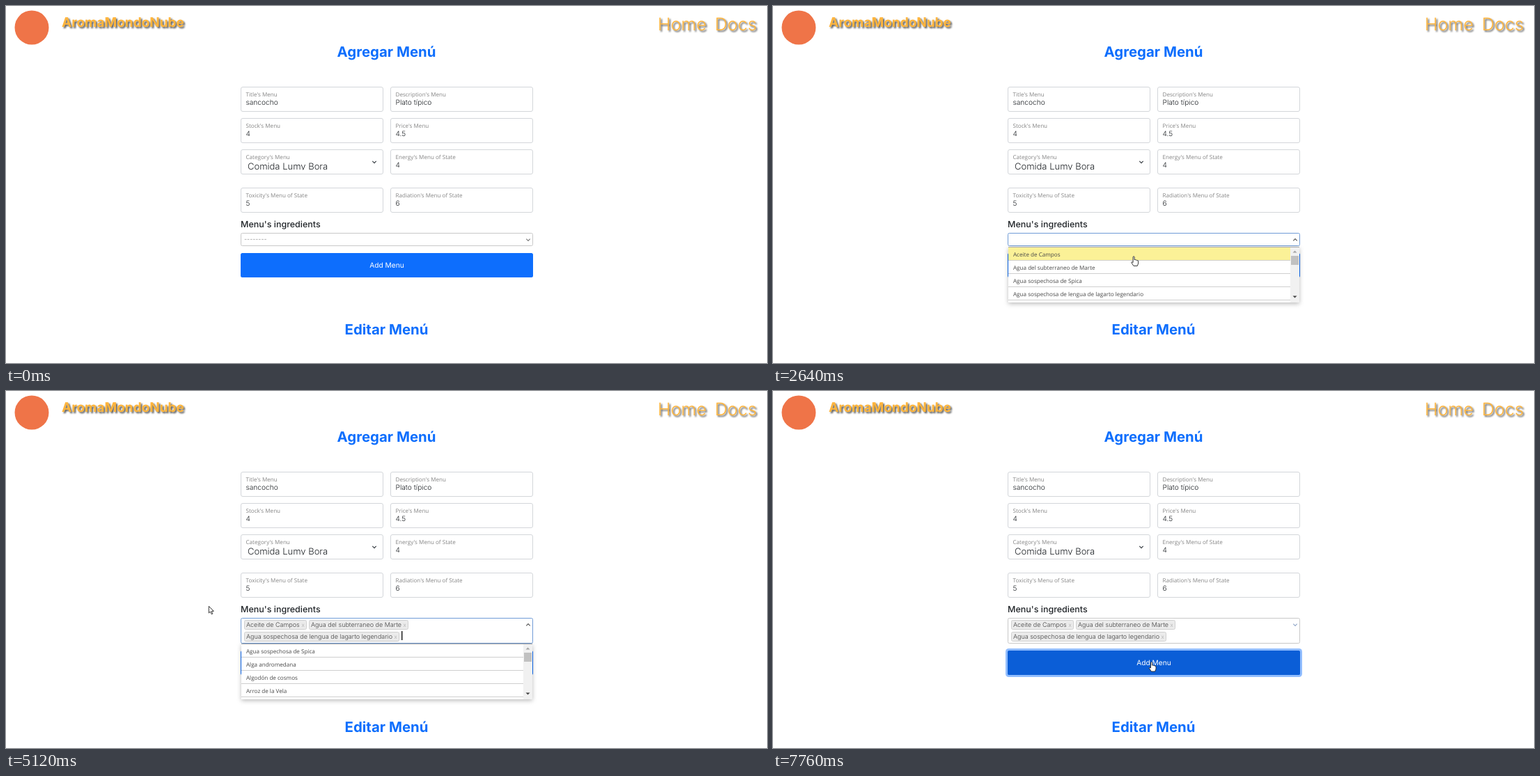
These frames come from a looping animation (1093 by 513 pixels, 8000 ms). An HTML page:

```html
<!DOCTYPE html>
<html lang="es">
<head>
<meta charset="utf-8">
<style>
html, body { margin: 0; width: 100%; height: 100%; overflow: hidden; background: #fff; }
svg { display: block; width: 1093px; height: 513px; }
text { font-family: Inter, sans-serif; font-weight: 300; white-space: pre; text-rendering: geometricPrecision; }
.brand { font-size: 19px; font-weight: 700; }
.nav { font-size: 25.2px; }
.brand, .nav { fill: #ffb53c; filter: drop-shadow(2px 2px 1px #555); }
.head { font-size: 20.4px; font-weight: 700; fill: #0d6efd; text-anchor: middle; }
.label, .item { font-family: "Open Sans", sans-serif; font-weight: 400; font-size: 8.1px; fill: #858585; }
.item { fill: #484848; }
.value { font-size: 10.2px; fill: #212529; }
.choice { font-size: 13px; fill: #212529; }
.title { font-size: 12.5px; font-weight: 500; fill: #212529; }
.add { font-size: 10.2px; font-weight: 400; fill: #fff; text-anchor: middle; }
.chip { font-size: 9px; fill: #444; }
.hint { font-size: 9px; fill: #777; }
.x { font-size: 8px; fill: #aaa; }
.line { fill: none; stroke-width: 1.1; }
.list { filter: drop-shadow(0 2px 3px #0004); }
</style>
</head>
<body>
<svg viewBox="0 0 1093 513"><g id="page"></g><g id="live"></g></svg>
<script>
const LOOP = 8000, LAG = 70, HOVER = 6250;
const CLICKS = [2030, 2970, 3740, 4540, 5460, 7140];
const [OPEN, ...PICKS] = CLICKS.slice(0, 4).map(t => t + LAG);
const CLOSE = CLICKS[4] + LAG, PRESS = CLICKS[5];

// Pointer moves: start, end, x, y, sag of the path
const MOVES = [
  [70, 470, 1019, 407], [1000, 1780, 719, 332], [2250, 2730, 507, 361],
  [3330, 3450, 499, 362], [3850, 4370, 483, 371], [4660, 5270, 273, 303],
  [5560, 6410, 543.5, 389, 80]
];

const ITEMS = [
  "Aceite de Campos", "Agua del subterraneo de Marte", "Agua sospechosa de Spica",
  "Agua sospechosa de lengua de lagarto legendario", "Alga andromedana",
  "Algodón de cosmos", "Arroz de la Vela"
];
const CHOSEN = [0, 1, 3].map(i => ITEMS[i]);
const FIELDS = [
  ["Title's Menu", "sancocho"], ["Description's Menu", "Plato típico"],
  ["Stock's Menu", "4"], ["Price's Menu", "4.5"],
  ["Category's Menu", ""], ["Energy's Menu of State", "4"],
  ["Toxicity's Menu of State", "5"], ["Radiation's Menu of State", "6"]
];

const ruler = document.createElement("canvas").getContext("2d");
ruler.font = "300 9px Inter, sans-serif";

const text = (x, y, s, cls) => `<text x="${x}" y="${y}" class="${cls}">${s}</text>`;
const rect = (x, y, w, h, fill, more = "") =>
  `<rect x="${x}" y="${y}" width="${w}" height="${h}" fill="${fill}" ${more}/>`;
const frame = (x, y, w, h, color, r = 2.5, fill = "#fff") =>
  rect(x + .5, y + .5, w - 1, h - 1, fill, `rx="${r}" stroke="${color}"`);
const chevron = (x, y, dir, color) =>
  `<path d="M${x - 2.7} ${y - 1.4 * dir}l2.7 ${2.8 * dir}l2.7 ${-2.8 * dir}" class="line" stroke="${color}"/>`;
const triangle = (x, y, dir, color) =>
  `<path d="M${x - 3} ${y - 1.5 * dir}h6l-3 ${3 * dir}z" fill="${color}"/>`;
const progress = (t, from, to) => Math.max(0, Math.min(1, (t - from) / (to - from)));

function field([label, value], i) {
  const row = i >> 1, x = 337 + 215 * (i % 2), y = 116 + 45 * row + (row > 2 ? 10 : 0);
  return frame(x, y, 205, 36, "#d3d6da") + text(x + 7.5, y + 14.3, label, "label") +
    text(x + 7.5, y + 26.2, value, "value");
}

function staticPage() {
  return `<circle cx="37" cy="31" r="24.5" fill="#ef7448"/>` +
    text(80, 29.5, "AromaMondoNube", "brand") +
    text(936, 34.5, "Home", "nav") + text(1018, 34.5, "Docs", "nav") +
    text(546.5, 72.5, "Agregar Menú", "head") +
    FIELDS.map(field).join("") +
    `<clipPath id="cut"><path d="M340 215h180v20.5h-180z"/></clipPath>` +
    `<g clip-path="url(#cut)">${text(347, 234.8, "Comida Lumy Bora", "choice")}</g>` +
    chevron(529, 224.3, 1, "#343a40") +
    text(337, 318, "Menu's ingredients", "title");
}

function pointer(t) {
  let x = 1048, y = 489;
  for (const [from, to, toX, toY, sag = 0] of MOVES) {
    const k = 1 - (1 - progress(t, from, to)) ** 1.75;
    x += (toX - x) * k;
    y += (toY - y) * k + sag * Math.sin(Math.PI * k);
  }
  return [x, y];
}

function button(t, shift) {
  const y = 355 + shift, hover = progress(t, HOVER, HOVER + 150);
  const ring = progress(t, PRESS, PRESS + 150);
  return rect(334, y - 3, 426, 41, "#0d6efd", `rx="4.5" opacity="${ring * .45}"`) +
    rect(337, y, 420, 35, "#0d6efd", `rx="2.5"`) +
    rect(337, y, 420, 35, "#0b5ed7", `rx="2.5" opacity="${hover}"`) +
    text(547, y + 20.6, "Add Menu", "add");
}

function selection(t, open, count, height) {
  let x = 342, y = 329, chips = "";
  for (const name of CHOSEN.slice(0, count)) {
    const w = Math.round(ruler.measureText(name).width) + 13;
    if (x + w > 745) [x, y] = [342, y + 17];
    chips += frame(x, y, w, 14, "#d0d0d0", 2, "#ebebeb") +
      text(x + 3, y + 10.2, name, "chip") + text(x + w - 7.5, y + 9.8, "x", "x");
    x += w + 3;
  }
  const since = t - (count ? PICKS[count - 1] : OPEN);
  const caret = open && since % 1060 < 530 ? rect(x, y - 1, 1.4, 13, "#111") : "";
  const hint = open || count ? "" : text(342, 337.5, "--------", "hint");
  return frame(337, 326, 420, height, open ? "#6f9bd6" : "#c8c8c8", 2) + chips + caret + hint +
    chevron(750, 336, open ? -1 : 1, open ? "#555" : count ? "#8fa5c8" : "#777");
}

function dropdown(y, count, active) {
  const taken = CHOSEN.slice(0, count);
  const rows = ITEMS.filter(name => !taken.includes(name)).slice(0, 4);
  let s = rect(338, y, 418, 80, "#fff", `class="list"`);
  rows.forEach((name, i) => {
    const top = y + 19 * i;
    if (i === active) s += rect(338, top + 1, 405, 18, "#fbf197");
    s += rect(338, top + 19, 405, 1, "#cfcfcf") + text(345, top + 14.3, name, "item");
  });
  return s + rect(338, y, 418, 1, "#aaa") + rect(743, y + 1, 13, 79, "#f1f1f1") +
    rect(744, y + 13, 11, 13, "#c1c1c1") +
    triangle(749.5, y + 7, -1, "#a3a3a3") + triangle(749.5, y + 72, 1, "#444");
}

function cursor(x, y, hand) {
  const shape = hand
    ? "M-1 1Q0-.6 1 1V5.2Q2.4 4.3 3 5.7Q4.3 4.9 4.9 6.2Q6.4 5.6 6.5 7.4V10.5L5.2 14H-.2L-3.3 9.2Q-3.4 7.5-1 9Z"
    : "M.5.5V10.3L2.8 8.2L4.4 12L6 11.3L4.4 7.6H7.5Z";
  return `<path transform="translate(${x} ${y})" d="${shape}" fill="#fff" stroke="#222" stroke-width=".9"/>`;
}

function scene(t) {
  const open = t >= OPEN && t < CLOSE;
  const count = PICKS.filter(p => t >= p).length;
  const wrap = count > 2 ? 17 : 0, shift = wrap + (count ? 1 : 0);
  const listTop = 346 + wrap;
  const [x, y] = pointer(t);
  const overList = open && x > 338 && x < 743 && y > listTop;
  let s = button(t, shift) + text(546.5, 471.5 + shift, "Editar Menú", "head") +
    selection(t, open, count, 19 + shift);
  if (open) {
    const active = overList ? Math.floor((y - listTop) / 19) : count ? -1 : 0;
    s += dropdown(listTop, count, active);
  }
  if (t < MOVES[0][0]) return s;
  if (CLICKS.some(c => t >= c && t < c + 130))
    s += `<circle cx="${x + 1}" cy="${y + 2}" r="10" fill="#ffed20" opacity=".8"/>`;
  return s + cursor(x, y, overList || t >= HOVER);
}

const live = document.getElementById("live");
document.getElementById("page").innerHTML = staticPage();
let last = "";
function draw(now) {
  const next = scene(now % LOOP);
  if (next !== last) live.innerHTML = last = next;
  requestAnimationFrame(draw);
}
requestAnimationFrame(draw);
</script>
</body>
</html>
```
